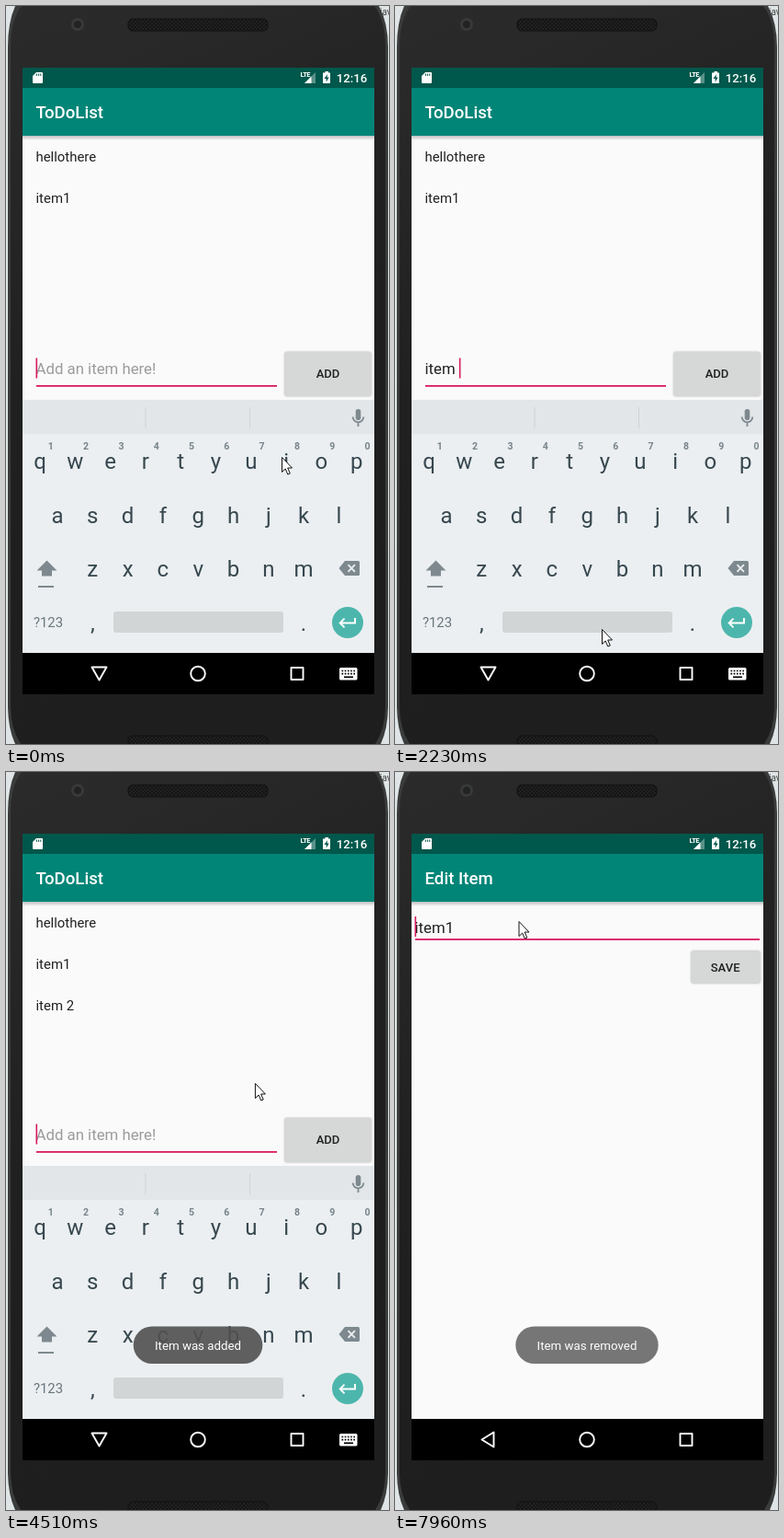
Write an HTML page that moves like this. It is 417 px wide and 802 px high and loops after 8 s.

```html
<!DOCTYPE html>
<html lang="en">
<head>
<meta charset="utf-8">
<title>To-do list demo</title>
<style>
html, body { margin: 0; width: 100%; height: 100%; overflow: hidden; background: #dfe5e6; }
svg { display: block; width: 417px; height: 802px; font-family: Roboto, "Noto Sans", sans-serif; }
text { white-space: pre; }
.mid { text-anchor: middle; }
.med { font-weight: 500; }
.key { font-size: 24px; fill: #37474f; text-anchor: middle; }
.small { font-size: 14.9px; fill: #69767c; text-anchor: middle; }
.sup { font-size: 10.5px; font-weight: 700; fill: #77848a; text-anchor: middle; }
.item { font-size: 14.9px; fill: #212121; }
.field { font-size: 16.8px; fill: #212121; }
.hint { font-size: 16.8px; fill: #9b9b9b; }
.sug { font-size: 16.5px; fill: #7b888e; text-anchor: middle; }
.sug.main { font-weight: 700; fill: #455a64; }
.pink { fill: #d81b60; }
.btn { fill: #d6d7d7; filter: drop-shadow(0 .5px 1px rgba(0,0,0,.3)); }
.icon { fill: #7d898e; }
.line { fill: none; stroke: #fff; stroke-width: 1.9; stroke-linejoin: round; }
</style>
</head>
<body>
<svg viewBox="0 0 417 802">
  <defs>
    <linearGradient id="face" x2=".25" y2="1">
      <stop offset="0" stop-color="#2b2b2b"/><stop offset=".1" stop-color="#292929"/>
      <stop offset=".5" stop-color="#202020"/><stop offset="1" stop-color="#1e1e1e"/>
    </linearGradient>
    <linearGradient id="shade" x2="0" y2="1">
      <stop offset="0" stop-color="#000" stop-opacity=".24"/><stop offset="1" stop-color="#000" stop-opacity="0"/>
    </linearGradient>
    <pattern id="mesh" width="4" height="4" patternUnits="userSpaceOnUse">
      <rect width="4" height="4" fill="#151515"/>
      <circle cx="1" cy="1" r=".7" fill="#343434"/><circle cx="3" cy="3" r=".7" fill="#343434"/>
    </pattern>
  </defs>

  <text x="407" y="10" font-size="10" fill="#444">iav</text>
  <path d="M10 0Q2 18 2 45V760Q2 785 10 802H408Q416 785 416 760V45Q416 18 406 0Z" fill="#3a3b3b"/>
  <path d="M17 0Q5 15 5 44V762Q5 785 16 802H402Q413 785 413 762V44Q413 15 401 0Z" fill="url(#face)"/>
  <circle cx="78" cy="20" r="7" fill="#393939"/><circle cx="78" cy="20" r="4" fill="#202224"/>
  <g fill="url(#mesh)" stroke="#111">
    <rect x="133" y="14" width="152" height="13" rx="5"/>
    <rect x="133" y="793" width="152" height="13" rx="5"/>
  </g>

  <rect x="18" y="67" width="383" height="681" fill="#fafafa"/>
  <rect x="18" y="141" width="383" height="5" fill="url(#shade)"/>
  <rect x="18" y="67" width="383" height="22" fill="#00574b"/>
  <rect x="18" y="89" width="383" height="52" fill="#008577"/>
  <g fill="#fff">
    <path d="M33 72H39Q40 72 40 73V83Q40 84 39 84H30Q29 84 29 83V76Z"/>
    <path d="M33.4 73.5v2.4M35.6 73.5v2.4M37.8 73.5v2.4" stroke="#00574b"/>
    <text x="320.500" y="77" font-size="7.500" font-weight="700" letter-spacing="-.6">LTE</text>
    <path d="M337 72V84H325Z" opacity=".35"/><path d="M332.500 76.500V84H325Z"/>
    <path d="M345 72.500h2.500V71h3.500v1.500H353V84H345Z"/>
    <path d="M350 74l-3.500 5h2.200v3.500l3-5h-2.200Z" fill="#00574b"/>
    <text class="med" x="359.800" y="83" font-size="13.200">12:16</text>
    <text class="med" id="title" x="32.500" y="122.300" font-size="18.640"></text>
  </g>

  <g id="home">
    <g id="list"></g>
    <text class="hint" id="hint" x="32.500" y="400">Add an item here!</text>
    <text class="field" id="field" x="32.500" y="400"></text>
    <rect id="compose" x="33" y="402.200" height="1.400" fill="#35a8dc"/>
    <rect class="pink" x="33" y="412" width="262" height="1.800"/>
    <rect class="pink" id="caret" y="382.500" width="1.600" height="22"/>
    <rect class="btn" x="303.500" y="376" width="94" height="48" rx="2"/>
    <text class="mid med" x="350.500" y="404.300" font-size="13.050" fill="#212121">ADD</text>

    <rect x="18" y="428" width="383" height="275" fill="#ebeff1"/>
    <rect x="18" y="428" width="383" height="37" fill="#e2e6e8"/>
    <path d="M152 436V459M265.500 436V459" stroke="#cdd2d5"/>
    <g id="sugs">
      <text class="sug" x="101" y="454"></text>
      <text class="sug main" x="209" y="454"></text>
      <text class="sug" x="316.500" y="454"></text>
      <g fill="#455a64"><circle cx="204" cy="462.500" r="1.300"/><circle cx="208.500" cy="462.500" r="1.300"/><circle cx="213" cy="462.500" r="1.300"/></g>
    </g>
    <rect class="icon" x="380.700" y="438" width="5.600" height="12" rx="2.800"/>
    <path d="M377.700 446.500a5.800 5.800 0 0 0 11.600 0M383.500 452.500V457" fill="none" stroke="#7d898e" stroke-width="1.800"/>
    <g id="letters">
      <path class="icon" d="M44.500 602.500L55.500 613.500H50V619.500H39V613.500H33.500Z"/>
      <rect class="icon" x="35" y="630" width="17" height="2"/>
      <rect x="117" y="658" width="185" height="23" rx="3" fill="#d1d5d6"/>
    </g>
    <g id="symbols"><rect x="155" y="658" width="108.500" height="23" rx="3" fill="#d1d5d6"/></g>
    <path class="icon" d="M369 603H383.500Q385 603 385 604.500V617.500Q385 619 383.500 619H369L362.500 611Z"/>
    <path d="M372.500 607.200l7.400 7.600m0-7.600l-7.400 7.600" stroke="#ebeff1" stroke-width="1.900"/>
    <circle cx="372" cy="670" r="17" fill="#4db6ac"/>
    <path d="M380 665V670.500H364M368.500 665.700L363.700 670.500L368.500 675.300" fill="none" stroke="#fff" stroke-width="1.900"/>
  </g>

  <g id="edit">
    <text class="field" x="21.500" y="174.500">item1</text>
    <rect class="pink" x="22" y="181" width="375" height="1.800"/>
    <rect class="pink" id="editCaret" x="21.500" y="157" width="1.600" height="22"/>
    <rect class="btn" x="322.500" y="194.500" width="75" height="35" rx="2"/>
    <text class="mid med" x="359.700" y="216.800" font-size="13.050" fill="#212121">SAVE</text>
  </g>

  <rect x="18" y="703" width="383" height="45"/>
  <circle class="line" cx="209" cy="725.500" r="7.800"/>
  <rect class="line" x="310.500" y="719" width="13" height="13"/>
  <path class="line" id="back"/>
  <g id="imeIcon">
    <rect x="363" y="719" width="19.500" height="13.500" rx="1.500" fill="#fff"/>
    <path d="M365.500 722.500H380.500M365.500 725.700H380.500" stroke="#000" stroke-width="1.700" stroke-dasharray="1.700 1.500"/>
    <path d="M368 729.300H378" stroke="#000" stroke-width="1.700"/>
  </g>

  <g id="toast">
    <rect y="602.500" height="40.500" rx="20.250" fill="rgb(80,80,80)" fill-opacity=".9"/>
    <text class="mid" x="209" y="628.300" font-size="13.300" fill="#fff"></text>
  </g>
  <path id="mouse" d="M.5.500V16.500L4.200 13L6.800 19L9.300 18L6.700 12H11.500Z" fill="#fff" stroke="#111"/>
</svg>
<script>
const LOOP = 8000;
const $ = id => document.getElementById(id);
const show = (id, on) => $(id).style.display = on ? "" : "none";
const label = (parent, cls, x, y, str) => {
  const el = document.createElementNS("http://www.w3.org/2000/svg", "text");
  el.setAttribute("class", cls);
  el.setAttribute("x", x);
  el.setAttribute("y", y);
  el.textContent = str;
  return $(parent).appendChild(el);
};

// Keyboard
const PITCH = 38.3;
const row = (parent, chars, x, y) =>
  [...chars].forEach((c, i) => label(parent, "key", x + i * PITCH, y, c));
row("letters", "qwertyuiop", 37, 503);
row("letters", "asdfghjkl", 56, 561.5);
row("letters", "zxcvbnm", 94.3, 620);
row("letters", ",", 94.3, 679);
row("letters", ".", 324, 679);
label("letters", "small", 46, 675, "?123");
[..."1234567890"].forEach((c, i) => label("letters", "sup", 48.8 + i * PITCH, 482, c));
row("symbols", "1234567890", 37, 503);
row("symbols", "@#$%&-+()", 56, 561.5);
row("symbols", "*\"':;!?", 94.3, 620);
row("symbols", ",_", 94.3, 679);
row("symbols", "/.", 286, 679);
label("symbols", "small", 46, 675, "ABC");
label("symbols", "small", 45, 615.5, "= \\ <").style.fontSize = "13px";
const rows = [164, 208.8, 253.6].map(y => label("list", "item", 32.5, y + 5, ""));

// Screen refresh times
const TICKS = [0, 120, 270, 390, 540, 690, 810, 1060,
  1180, 1330, 1450, 1600, 1750, 1870, 1990, 2110,
  2230, 2380, 2500, 2620, 2800, 2950, 3070, 3190,
  3310, 3430, 3580, 3700, 3820, 3970, 4090, 4210,
  4360, 4480, 4630, 4750, 4900, 5050, 5330,
  5890, 6010, 6160, 6280, 6430, 6560, 6790, 6920,
  7060, 7200, 7320, 7450, 7570, 7700, 7830, 7960];

// Pointer: time, x, y
const PATH = [[0, 300, 490], [270, 307, 497], [390, 307, 497], [690, 192, 497],
  [810, 190, 497], [1060, 118, 498], [1180, 116, 497], [1600, 332, 614],
  [1750, 334, 616], [2110, 235, 676], [2230, 225, 677], [2500, 42, 677],
  [2620, 42, 678], [2950, 63.5, 494], [3190, 72, 497], [3700, 352, 405],
  [3820, 360.5, 401], [4090, 360, 402], [4210, 338, 395], [5050, 62.5, 161],
  [6010, 62.5, 161], [6430, 60, 158], [7450, 51.5, 159.5], [7700, 52, 160], [7960, 134.5, 162]];

// State changes in order of time
const EVENTS = [
  [0, { title: "ToDoList", items: ["hellothere", "item1"], text: "", sugs: null, caret: 1,
        symbols: 0, fade: 1, toast: "", alpha: 1, edit: 0 }],
  [390, { text: "i", sugs: ["in", "I", "I'm"] }],
  [810, { text: "it", sugs: ["it's", "it", "its"] }],
  [1180, { text: "ite", sugs: ["it's", "ITE", "its"] }],
  [1750, { text: "item", sugs: ["items", "item", "Item"] }],
  [2230, { text: "item ", sugs: null }],
  [2620, { symbols: 1 }],
  [2800, { caret: 0 }],
  [3070, { text: "item 2", caret: 1 }],
  [3580, { caret: 0 }],
  [4090, { text: "", caret: 1, symbols: 0, items: ["hellothere", "item1", "item 2"] }],
  [4360, { toast: "Item was added", alpha: .5 }],
  [4480, { alpha: 1 }],
  [4630, { caret: 0 }],
  [5050, { caret: 1 }],
  [5330, { caret: 0 }],
  [5890, { caret: 1, fade: .1 }],
  [6010, { fade: .03 }],
  [6160, { fade: 1, items: ["item1", "item 2"] }],
  [6280, { alpha: .5 }],
  [6430, { toast: "", caret: 0 }],
  [6560, { toast: "Item was removed", alpha: .6 }],
  [6790, { alpha: 1 }],
  [6920, { caret: 1 }],
  [7450, { caret: 0 }],
  [7830, { title: "Edit Item", edit: 1 }],
  [7960, { caret: 1, alpha: .86 }]
];

function pointer(t) {
  const i = PATH.findIndex(p => p[0] > t);
  if (i < 0) return PATH[PATH.length - 1].slice(1);
  const a = PATH[i - 1], b = PATH[i];
  const k = (t - a[0]) / (b[0] - a[0]);
  const e = k * k * (3 - 2 * k);
  return [a[1] + (b[1] - a[1]) * e, a[2] + (b[2] - a[2]) * e];
}

function draw(t) {
  const s = Object.assign({}, ...EVENTS.filter(e => e[0] <= t).map(e => e[1]));
  $("title").textContent = s.title;
  show("home", !s.edit);
  show("edit", s.edit);
  show("imeIcon", !s.edit);
  $("back").setAttribute("d", s.edit ? "M107.500 717.500V733.500L94.500 725.500Z" : "M93.500 718.500H109.500L101.500 732.500Z");

  rows.forEach((el, i) => el.textContent = s.items[i] || "");
  rows[0].style.opacity = s.fade;
  $("field").textContent = s.text;
  show("hint", !s.text);
  const width = s.text && !s.edit ? $("field").getComputedTextLength() : 0;
  $("compose").setAttribute("width", s.sugs ? width : 0);
  $("caret").setAttribute("x", 32.5 + width);
  show("caret", s.caret);
  show("editCaret", s.caret);

  show("sugs", s.sugs);
  if (s.sugs) s.sugs.forEach((w, i) => $("sugs").children[i].textContent = w);
  show("letters", !s.symbols);
  show("symbols", s.symbols);

  show("toast", s.toast);
  const [pill, words] = $("toast").children;
  words.textContent = s.toast;
  if (s.toast) {
    const w = words.getComputedTextLength() + 46.5;
    pill.setAttribute("x", 209 - w / 2);
    pill.setAttribute("width", w);
  }
  $("toast").style.opacity = s.alpha;
  $("mouse").setAttribute("transform", `translate(${pointer(t)})`);
}

let last = -1;
function loop() {
  const now = performance.now() % LOOP;
  const tick = TICKS.filter(t => t <= now).pop();
  if (tick !== last) draw(last = tick);
  requestAnimationFrame(loop);
}
loop();
</script>
</body>
</html>
```
